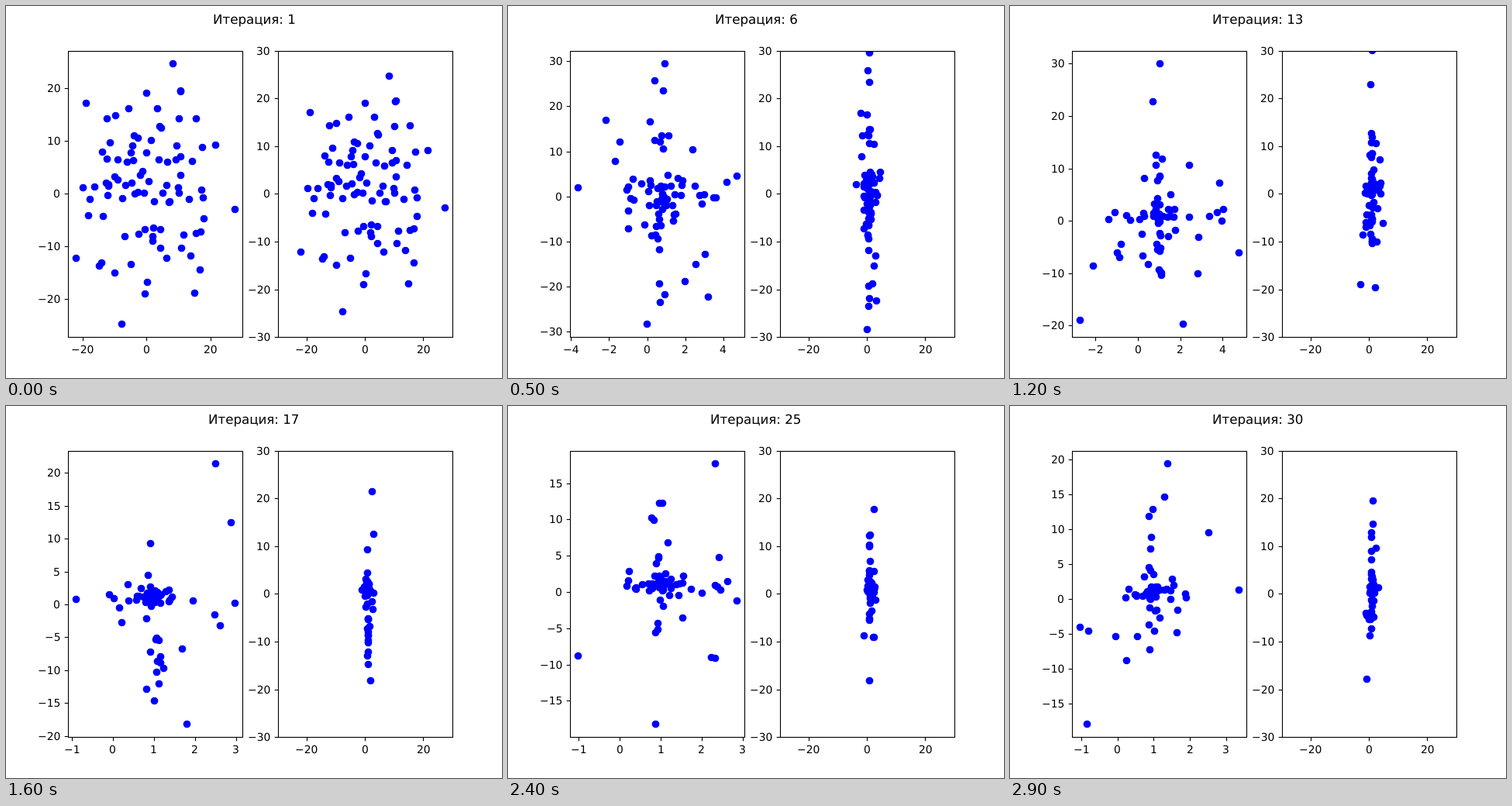
Write an HTML page with a canvas that moves like this. It is 640 by 480 pixels and loops after 3 s.

```html
<!DOCTYPE html>
<html lang="ru">
<head>
<meta charset="utf-8">
<title>Итерации</title>
<style>
  html, body { margin: 0; width: 100%; height: 100%; overflow: hidden; background: #fff; }
  canvas { display: block; }
</style>
</head>
<body>
<canvas id="stage" width="640" height="480"></canvas>
<script>
const ctx = document.getElementById('stage').getContext('2d');
const GENERATIONS = 30;
const STEP_MS = 100;
const TOP = 57.6, BOTTOM = 427.2;
const FIXED = [-30, 30];

// Extent of the population at key iterations; the rest is interpolated.
const extents = [
  { at: 1, x: [-22, 27.5], y: [-24.7, 24.6] },
  { at: 4, x: [-5.8, 6.87], y: [-30, 30] },
  { at: 9, x: [-2.42, 3.49], y: [-27.5, 29.2] },
  { at: 13, x: [-2.74, 4.76], y: [-19.7, 30] },
  { at: 17, x: [-0.9, 2.97], y: [-18.2, 21.4] },
  { at: 25, x: [-1.02, 2.86], y: [-18.2, 17.7] },
  { at: 30, x: [-1.04, 3.35], y: [-17.9, 19.4] }
];

function makeRandom(seed) {
  return () => {
    seed = (seed + 0x6D2B79F5) | 0;
    let t = Math.imul(seed ^ (seed >>> 15), 1 | seed);
    t = (t + Math.imul(t ^ (t >>> 7), 61 | t)) ^ t;
    return ((t ^ (t >>> 14)) >>> 0) / 4294967296;
  };
}

function extentAt(iteration) {
  const next = Math.max(1, extents.findIndex(e => e.at >= iteration));
  const a = extents[next - 1], b = extents[next];
  const t = (iteration - a.at) / (b.at - a.at);
  const eased = 1 - (1 - t) ** 2;
  const mix = (from, to) => from.map((v, i) => v + (to[i] - v) * eased);
  return { x: mix(a.x, b.x), y: mix(a.y, b.y) };
}

// Every coordinate is either settled close to the optimum (1, 1) or still free.
function breed(iteration) {
  const random = makeRandom(iteration * 7919);
  const gauss = () =>
    Math.sqrt(-2 * Math.log(1 - random())) * Math.cos(2 * Math.PI * random());
  const decay = span => Math.exp((1 - iteration) / span);

  const { x, y } = extentAt(iteration);
  const count = Math.round(62 + 28 * decay(9));
  const settled = 0.5 * (1 - decay(4));
  const optimum = 1 - decay(4);

  const draw = ([lo, hi], narrow) => {
    const spread = random() < settled ? narrow : 0.21 * (hi - lo);
    let value;
    do value = optimum + gauss() * spread; while (value < lo || value > hi);
    return value;
  };
  const drawX = () => draw(x, 0.1 + decay(4));
  const drawY = () => draw(y, 0.6 + 3 * decay(5));

  const points = [
    ...x.map(edge => [edge, drawY()]),
    ...y.map(edge => [drawX(), edge])
  ];
  while (points.length < count) points.push([drawX(), drawY()]);
  return { points, x, y };
}

const pad = ([lo, hi]) => [lo - (hi - lo) * 0.05, hi + (hi - lo) * 0.05];
const snap = v => Math.floor(v + 0.5) + 0.5;

function ticks([lo, hi], bins) {
  const raw = (hi - lo) / bins;
  const power = 10 ** Math.floor(Math.log10(raw));
  const step = power * [1, 2, 2.5, 5, 10].find(s => s * power >= raw - 1e-9);
  const digits = step % 1 ? 1 : 0;
  const list = [];
  for (let i = Math.ceil(lo / step - 1e-9); i * step <= hi + 1e-9; i++) {
    const label = Math.abs(i * step).toFixed(digits);
    list.push({ value: i * step, label: (i < 0 ? '\u2212' : '') + label });
  }
  return list;
}

// align: 0.5 centres the text on x, 1 ends it there.
function write(text, x, baseline, size, align) {
  ctx.font = size + 'px "DejaVu Sans", sans-serif';
  ctx.textRendering = 'geometricPrecision';
  ctx.fillText(text, Math.round(x - ctx.measureText(text).width * align), baseline);
}

function line(x1, y1, x2, y2) {
  ctx.beginPath();
  ctx.moveTo(x1, y1);
  ctx.lineTo(x2, y2);
  ctx.stroke();
}

function drawPlot(left, right, limX, limY, points) {
  const toX = v => left + (v - limX[0]) / (limX[1] - limX[0]) * (right - left);
  const toY = v => BOTTOM - (v - limY[0]) / (limY[1] - limY[0]) * (BOTTOM - TOP);
  const x0 = snap(left), x1 = snap(right), y0 = snap(TOP), y1 = snap(BOTTOM);

  ctx.save();
  ctx.beginPath();
  ctx.rect(x0, y0, x1 - x0, y1 - y0);
  ctx.clip();
  ctx.fillStyle = '#00f';
  for (const [x, y] of points) {
    ctx.beginPath();
    ctx.arc(Math.floor(toX(x)) + 0.5, Math.floor(toY(y)) + 0.5, 4.86, 0, 2 * Math.PI);
    ctx.fill();
  }
  ctx.restore();

  ctx.fillStyle = ctx.strokeStyle = '#000';
  ctx.lineWidth = 1.11;
  for (const { value, label } of ticks(limX, 5)) {
    const x = toX(value);
    line(snap(x), y1, snap(x), y1 + 4.86);
    write(label, x, 448, 13.89, 0.5);
  }
  for (const { value, label } of ticks(limY, 9)) {
    const y = snap(toY(value));
    line(x0, y, x0 - 4.86, y);
    write(label, left - 9.72, y + 4.5, 13.89, 1);
  }
  ctx.strokeRect(x0, y0, x1 - x0, y1 - y0);
}

const generations = Array.from({ length: GENERATIONS }, (_, i) => breed(i + 1));
let shown = -1;

function render(index) {
  const { points, x, y } = generations[index];
  ctx.fillStyle = '#fff';
  ctx.fillRect(0, 0, 640, 480);
  drawPlot(80, 305.45, pad(x), pad(y), points);
  drawPlot(350.55, 576, FIXED, FIXED, points);
  write('Итерация: ' + (index + 1), 320, 23, 16.67, 0.5);
}

const start = performance.now();
function tick() {
  const elapsed = Math.max(0, performance.now() - start);
  const index = Math.floor(elapsed / STEP_MS) % GENERATIONS;
  if (index !== shown) render(shown = index);
  requestAnimationFrame(tick);
}
tick();
</script>
</body>
</html>
```
